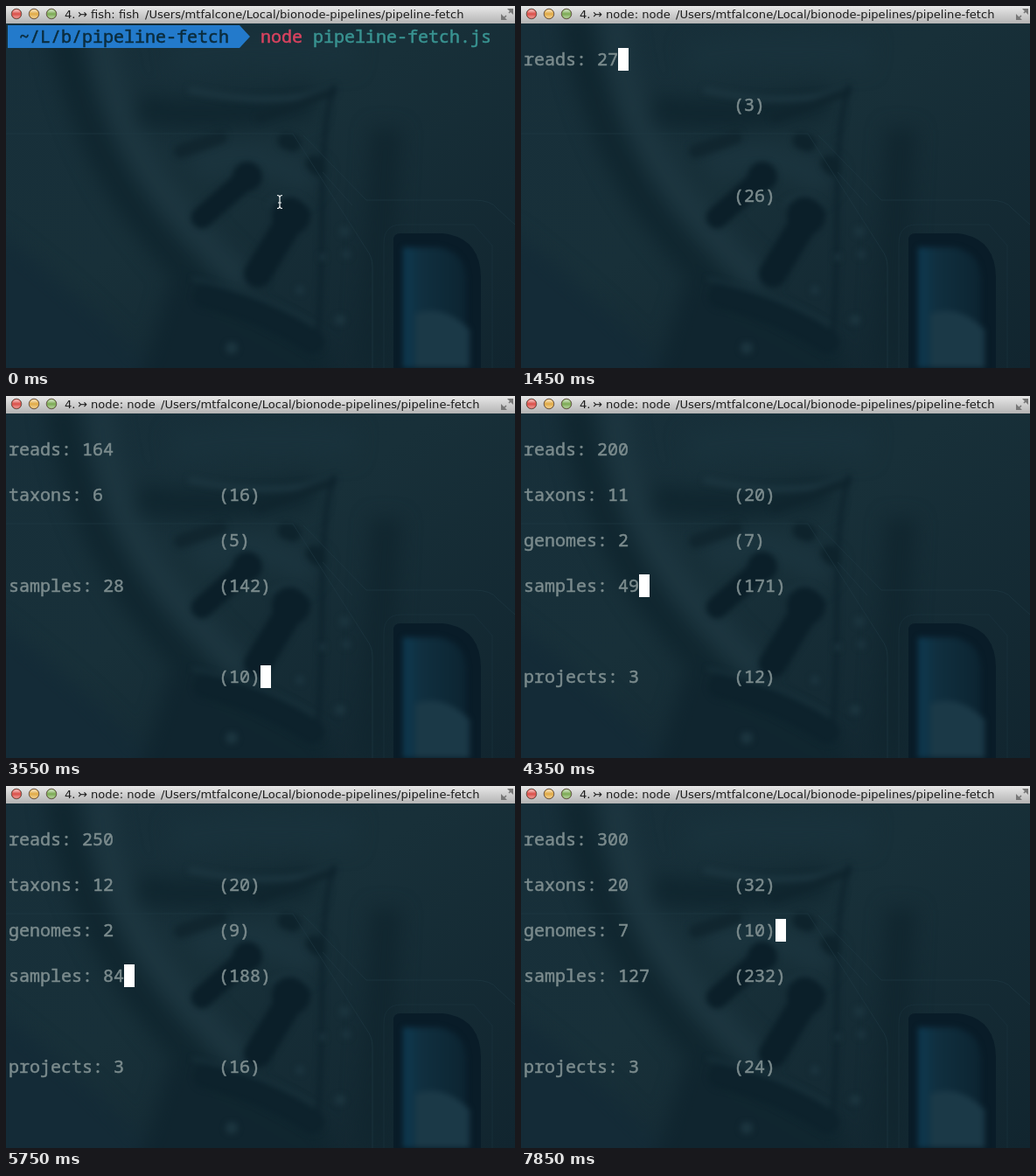
These frames come from a looping animation (582 by 414 pixels, 8000 ms). An HTML page:

```html
<!DOCTYPE html>
<html lang="en">
<head>
<meta charset="utf-8">
<title>Terminal pipeline</title>
<style>
html, body { margin: 0; width: 100%; height: 100%; overflow: hidden; background: #152d39; }
svg { display: block; width: 582px; height: 414px; }
text { white-space: pre; }
filter { color-interpolation-filters: sRGB; }
.mono { font: 20px "Noto Sans Mono", "DejaVu Sans Mono", monospace; }
.mono text { fill: var(--ink); stroke: var(--ink); stroke-width: .5px; }
.bar { font: 13.1px "DejaVu Sans", sans-serif; fill: #1c1c1c; }
</style>
</head>
<body>
<svg id="stage" viewBox="0 0 582 414" xmlns="http://www.w3.org/2000/svg">
  <defs>
    <linearGradient id="barFill" x2="0" y2="1">
      <stop offset="0" stop-color="#e8e8e8"/><stop offset="1" stop-color="#b4b4b4"/>
    </linearGradient>
    <linearGradient id="sky" x2="1" y2="1">
      <stop offset="0" stop-color="#172f3a"/><stop offset=".45" stop-color="#183039"/>
      <stop offset="1" stop-color="#11252f"/>
    </linearGradient>
    <linearGradient id="panel">
      <stop offset="0" stop-color="#0e3950"/><stop offset=".3" stop-color="#102f3f"/>
      <stop offset="1" stop-color="#0c2431"/>
    </linearGradient>
    <linearGradient id="gloss" x2="0" y2="1">
      <stop offset="0" stop-color="#fff" stop-opacity=".75"/>
      <stop offset=".5" stop-color="#fff" stop-opacity=".05"/>
      <stop offset="1" stop-color="#fff" stop-opacity=".5"/>
    </linearGradient>
    <filter id="soft" x="-30%" y="-30%" width="160%" height="160%"><feGaussianBlur stdDeviation="3"/></filter>
    <filter id="haze" x="-50%" y="-50%" width="200%" height="200%"><feGaussianBlur stdDeviation="11"/></filter>
  </defs>

  <rect width="582" height="414" fill="url(#sky)"/>
  <g filter="url(#haze)" fill="none">
    <path d="M-20 250Q90 330 190 440H-20Z" fill="#142b37"/>
    <path d="M190 310L370 400V440H150Z" fill="#10252f"/>
    <path d="M62 10C80 140 140 250 250 345L360 410" stroke="#10262f" stroke-width="34"/>
    <path d="M108 10C115 130 165 215 275 318" stroke="#1d3640" stroke-width="30"/>
    <path d="M150 118Q240 132 350 108" stroke="#10262f" stroke-width="34"/>
    <path d="M190 60Q290 40 400 55" stroke="#19323c" stroke-width="36"/>
    <path d="M215 185Q290 155 350 205" stroke="#1b343e" stroke-width="34"/>
    <path d="M435 140L420 414" stroke="#11262f" stroke-width="34"/>
  </g>
  <g filter="url(#soft)" fill="none" stroke-linecap="round" stroke="#0b1f29">
    <path d="M212 96Q300 116 372 97" stroke="#1b343e" stroke-width="8"/>
    <path d="M290 128L374 98" stroke="#10252e" stroke-width="9"/>
    <path d="M200 166L245 150" stroke="#11262f" stroke-width="16"/>
    <path d="M375 92C354 155 366 265 357 372" stroke="#0e232d" stroke-width="5"/>
    <path d="M224 242L274 198" stroke-width="25"/>
    <circle cx="276" cy="195" r="10" stroke-width="14"/>
    <path d="M288 306L322 250" stroke-width="32"/>
    <circle cx="326" cy="240" r="12" stroke-width="20"/>
    <path d="M228 332Q295 348 350 384" stroke="#0d222c" stroke-width="28"/>
    <path d="M214 312Q300 332 352 364" stroke="#19323c" stroke-width="3"/>
    <path d="M320 154L328 157M352 180L357 185" stroke="#0e232c" stroke-width="19"/>
    <path d="M300 226Q325 205 347 229" stroke="#1c353f" stroke-width="3"/>
  </g>
  <g fill="none" stroke="#203a45" stroke-width="1" opacity=".6">
    <path d="M0 146H328L412 278Q419 287 419 298V414"/>
    <path d="M340 148L412 222H535Q555 222 562 232L582 250"/>
    <path d="M432 414V272Q432 250 452 250H535L556 274V414" opacity=".7"/>
    <path d="M362 190L396 228"/>
  </g>
  <g fill="#1c353f" filter="url(#soft)">
    <circle cx="387" cy="258" r="6"/><circle cx="382" cy="359" r="6"/><circle cx="336" cy="325" r="5"/>
    <circle cx="362" cy="287" r="4"/><circle cx="389" cy="284" r="5"/><circle cx="258" cy="391" r="7"/>
  </g>
  <path d="M443 414V268Q443 260 451 260H499Q542 264 543 310V414Z" fill="#091c28"/>
  <g filter="url(#soft)">
    <path d="M454 414V276H494Q525 281 526 312V414Z" fill="url(#panel)"/>
    <path d="M468 414V352Q500 340 530 370V414Z" fill="#1b3947"/>
  </g>

  <rect width="582" height="20" fill="url(#barFill)"/>
  <g id="lights"></g>
  <g stroke="#777" fill="#777" stroke-width="1.6">
    <path d="M568 15L572 11M575 8L579 4" fill="none"/>
    <path d="M573 3H580V10ZM566 9V16H573Z" stroke="none"/>
  </g>
  <g class="bar">
    <text x="67" y="14">4.</text><text x="82" y="14">↣</text>
    <text id="job" x="97" y="14"></text><text id="path" y="14">/Users/mtfalcone/Local/bionode-pipelines/pipeline-fetch</text>
  </g>

  <g id="prompt" class="mono">
    <path d="M2 22H267L279 35L267 48H2Z" fill="#237acb"/>
    <text x="15" y="42" style="--ink: #0b2c3d">~/L/b/pipeline-fetch</text>
    <text x="291" y="42" style="--ink: #d9435f">node</text>
    <text x="351" y="42" style="--ink: #399391">pipeline-fetch.js</text>
  </g>
  <g id="output" class="mono" style="--ink: #7b8b8d"></g>
  <rect id="cursor" width="12" height="26" fill="#fff"/>
  <path id="beam" d="M310 216.5Q313 216.5 313 219V229Q313 231.5 310 231.5M316 216.5Q313 216.5 313 219M313 229Q313 231.5 316 231.5M311 225H315" fill="none" stroke="#f2f5f5" stroke-width="1.2"/>
</svg>
<script>
const LOOP = 8000, STEP = 50, START = 1450;
const LEFT = 3, TOP = 22, CELL = 12, LINE = 26, TOTAL_COL = 20;
const $ = id => document.getElementById(id);

function add(parent, tag, attrs) {
  const el = document.createElementNS("http://www.w3.org/2000/svg", tag);
  for (const key in attrs) el.setAttribute(key, attrs[key]);
  return parent.appendChild(el);
}

["#d8443d", "#dfa53a", "#73a548"].forEach((fill, i) => {
  const at = { cx: 12 + 20 * i, cy: 9, r: 5.8 };
  add($("lights"), "circle", { ...at, fill, stroke: "#6b5a50", "stroke-width": 1 });
  add($("lights"), "circle", { ...at, r: 4.8, fill: "url(#gloss)" });
});

// Lower case keys are finished counts, upper case keys the totals beside them.
const times = [1450, 1950, 2100, 2400, 2550, 3250, 4100, 4350, 5750, 6550, 6650, 7500, 7850];
const counts = {
  r: [27, 45, 50, 90, 100, 150, 190, 200, 250, 250, 262, 295, 300],
  t: [0, 0, 0, 0, 2, 5, 10, 11, 12, 19, 20, 20, 20],
  T: [3, 5, 6, 10, 11, 15, 19, 20, 20, 21, 21, 31, 32],
  g: [0, 0, 0, 0, 0, 0, 2, 2, 2, 5, 5, 7, 7],
  G: [0, 1, 2, 3, 3, 5, 7, 7, 9, 9, 9, 9, 10],
  s: [0, 0, 0, 1, 3, 20, 43, 49, 84, 96, 97, 120, 127],
  S: [26, 60, 70, 90, 93, 130, 165, 171, 188, 199, 200, 225, 232],
  p: [0, 0, 0, 0, 0, 0, 1, 3, 3, 3, 3, 3, 3],
  P: [0, 3, 4, 6, 6, 9, 12, 12, 16, 20, 20, 20, 24]
};
const rows = { r: [1, "reads"], t: [3, "taxons"], g: [5, "genomes"], s: [7, "samples"], p: [11, "projects"] };
const writes = "rsTSstSsGrSsPsS";

const fields = {};
for (const key in counts) {
  const [row, name] = rows[key.toLowerCase()];
  const total = key !== key.toLowerCase();
  const col = total ? TOTAL_COL : 0;
  const el = add($("output"), "text", { x: LEFT + col * CELL, y: TOP + row * LINE + 20 });
  fields[key] = { row, col, el, format: n => !n ? "" : total ? `(${n})` : `${name}: ${n}` };
}

function countAt(key, t) {
  const list = counts[key];
  let i = 0;
  while (i < times.length - 1 && times[i + 1] <= t) i++;
  if (i === times.length - 1) return list[i];
  const k = Math.max(0, (t - times[i]) / (times[i + 1] - times[i]));
  return Math.floor(list[i] + (list[i + 1] - list[i]) * k);
}

// Output arrives in steps, with a few pauses.
function tick(t) {
  for (const [from, to] of [[1950, 2100], [2100, 2400], [6550, 6650]])
    if (t >= from && t < to) return from;
  return Math.min(7850, Math.floor(t / STEP) * STEP);
}

function writtenField(t) {
  const i = (t - START) / STEP;
  let key = writes[i % writes.length];
  if (i > 0 && countAt(key, t) === countAt(key, t - STEP)) key = "s";
  if (!countAt(key, t)) key = key.toUpperCase();
  return countAt(key, t) ? key : "r";
}

function placeCursor(row, col) {
  $("cursor").setAttribute("x", LEFT + col * CELL);
  $("cursor").setAttribute("y", TOP + row * LINE);
}

const show = (id, on) => $(id).setAttribute("visibility", on ? "visible" : "hidden");

function draw(t) {
  const running = t >= 400;
  $("job").textContent = running ? "node: node" : "fish: fish";
  $("path").setAttribute("x", running ? 177 : 159);
  show("prompt", t < 800);
  show("beam", t < 350);
  show("cursor", t >= 350);
  show("output", t >= START);

  if (t < START) {
    placeCursor(t < 800 ? 1 : t < 900 ? 0 : 8, 0);
    return;
  }
  const now = tick(t);
  for (const key in fields) {
    const f = fields[key];
    f.el.textContent = f.format(countAt(key, now));
  }
  const f = fields[writtenField(now)];
  placeCursor(f.row, f.col + f.el.textContent.length);
}

const begin = performance.now();
function frame() {
  draw((performance.now() - begin) % LOOP);
  requestAnimationFrame(frame);
}
frame();
</script>
</body>
</html>
```
